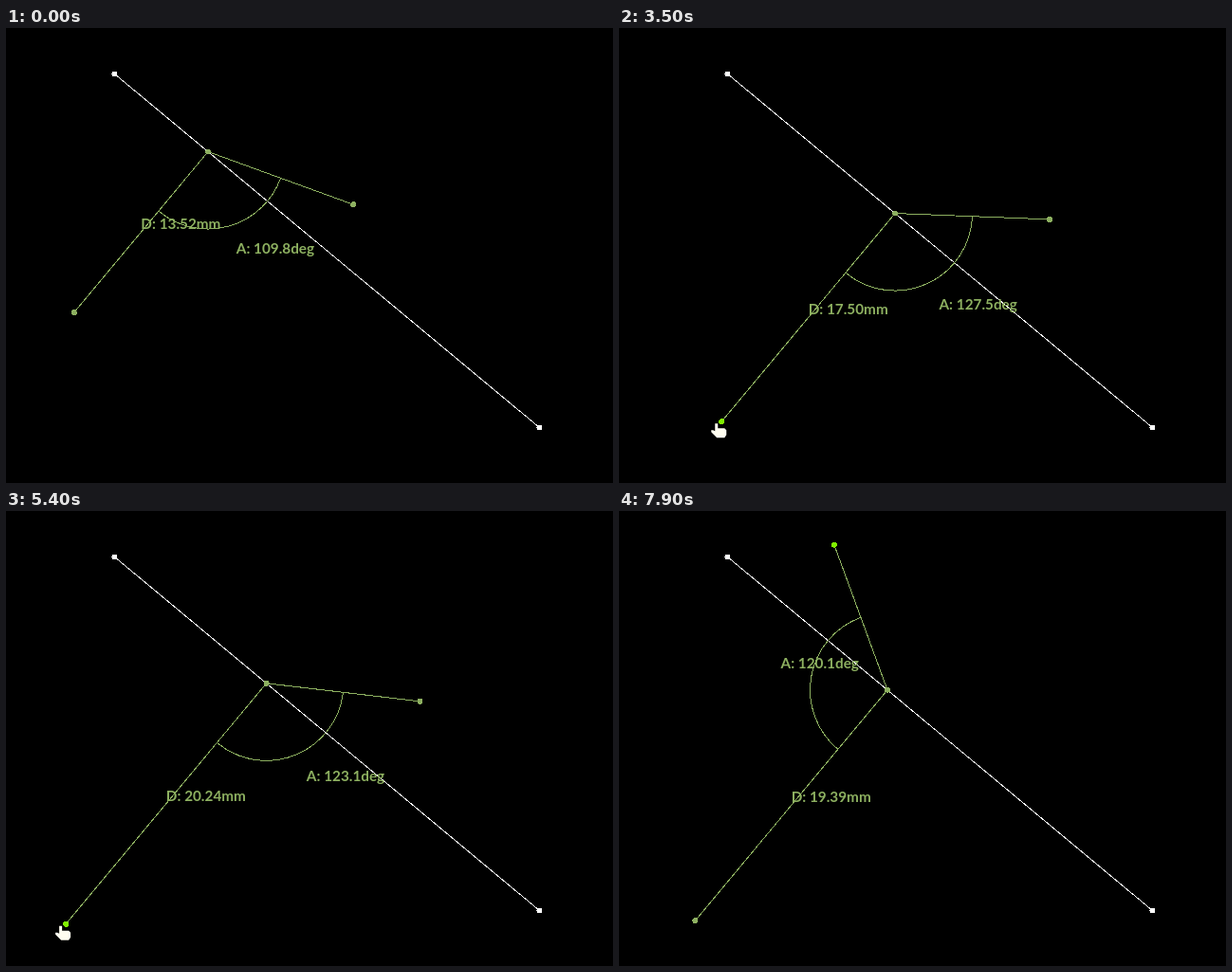
Write an HTML page that moves like this. It is 640 px wide and 480 px high and loops after 8 s.

```html
<!DOCTYPE html>
<html lang="en">
<head>
<meta charset="utf-8">
<title>Distance and angle measurement</title>
<style>
  html, body { margin: 0; width: 100%; height: 100%; overflow: hidden; background: #000; }
  svg { display: block; width: 640px; height: 480px; }
  .axis, .tool, circle { shape-rendering: crispEdges; }
  .axis { stroke: #fff; }
  .tool { stroke: #8db060; fill: none; }
  .dot { fill: #8db060; }
  .hot { fill: #80f000; }
  text { fill: #8db060; font: 700 15.3px Lato, "Open Sans", sans-serif; }
</style>
</head>
<body>
<svg viewBox="0 0 640 480">
  <path class="axis" d="M114.5 48.5L562.5 421.5"/>
  <g fill="#fff"><circle cx="114.5" cy="48.5" r="3"/><circle cx="562.5" cy="421.5" r="3"/></g>
  <path class="tool" id="rays"/>
  <path class="tool" id="arc"/>
  <circle class="dot" id="vertex" r="3"/>
  <circle class="dot" id="foot" r="3"/>
  <circle class="dot" id="arm" r="3"/>
  <text id="dist"/>
  <text id="angle"/>
  <path id="pointer" fill="#2a2618" stroke="#f3ecc8" d="M0 0v16.5l4-3.5 3 6 3-1.5-3-5.5h5z"/>
  <path id="hand" fill="#fffdf0" d="M-1 0h3v5h7l2 2v5l-2 3h-8l-6-6v-2h2l2 1z"/>
</svg>
<script>
const LOOP = 8000, MM = 16.33, ARM = 163;
const SLOPE = 373 / 448;
const NORMAL = 90 + Math.atan(SLOPE) * 180 / Math.PI;

// Turning points of each gesture, time first
const slide = [ // vertex x, distance in mm
  [1600, 213, 13.52], [1900, 202, 13.31], [2450, 171.5, 13.7], [2900, 200.5, 14.16],
  [4000, 360, 20.04], [4800, 292.5, 21.85], [5200, 270, 20.7], [5700, 283, 19.39]
];
const swing = [ // extra degrees, hand distance from the vertex
  [6500, 0, 166], [6750, 40, 200], [7000, -33, 312], [7900, 114.6, 218]
];
const roam = [ // pointer x, y
  [600, 420, 338], [1300, 68, 298], [5800, 78, 434], [6300, 452, 208]
];

function ease(keys, t) {
  const next = keys.findIndex(k => k[0] > t);
  const b = keys.at(next), a = next > 0 ? keys[next - 1] : b;
  const u = a === b ? 0 : (t - a[0]) / (b[0] - a[0]);
  const s = u * u * (3 - 2 * u);
  return a.slice(1).map((v, i) => v + (b[i + 1] - v) * s);
}

// The free arm trails behind the vertex, so its angle opens as the vertex slides
const trail = x => 109.8 + (x - 213) * (0.22143 + 0.000711 * (x - 283));

function polar([x, y], r, deg) {
  const a = deg * Math.PI / 180;
  return [x + r * Math.cos(a), y + r * Math.sin(a)];
}

function place(id, at) {
  const node = document.getElementById(id);
  node.style.display = at ? "" : "none";
  if (at) node.setAttribute("transform", `translate(${at})`);
  return node;
}

function label(id, text, [x, y]) {
  place(id, [x, y - 3]).textContent = text;
}

function draw(t) {
  const [x, mm] = ease(slide, t);
  const [extra, reach] = ease(swing, t);
  const v = [x, 48.5 + (x - 114.5) * SLOPE];
  const turn = trail(x) + extra, heading = NORMAL - turn;
  const sweep = turn > 180 ? 360 - turn : -turn;
  const foot = polar(v, mm * MM, NORMAL), arm = polar(v, ARM, heading);
  const r = ARM / 2;

  rays.setAttribute("d", `M${foot}L${v}L${arm}`);
  arc.setAttribute("d",
    `M${polar(v, r, NORMAL)}A${r} ${r} 0 0 ${+(sweep > 0)} ${polar(v, r, heading)}`);
  label("dist", `D: ${mm.toFixed(2)}mm`, polar(v, mm * MM / 2, NORMAL));
  label("angle", `A: ${Math.abs(sweep).toFixed(1)}deg`, polar(v, ARM * 0.7, NORMAL + sweep / 2));

  const onFoot = t >= 1400 && t < 5800, onArm = t >= 6500;
  place("vertex", v);
  place("foot", foot).classList.toggle("hot", onFoot);
  place("arm", arm).classList.toggle("hot", onArm);
  place("hand", onFoot ? [foot[0] - 6, foot[1] + 2] : onArm && polar(v, reach, heading));
  place("pointer", t >= 600 && !onFoot && !onArm && ease(roam, t));
}

const rays = document.getElementById("rays"), arc = document.getElementById("arc");
const start = performance.now();
function tick() {
  const t = (performance.now() - start) % LOOP;
  draw(Math.floor(t / 100) * 100);
  requestAnimationFrame(tick);
}
tick();
</script>
</body>
</html>
```
